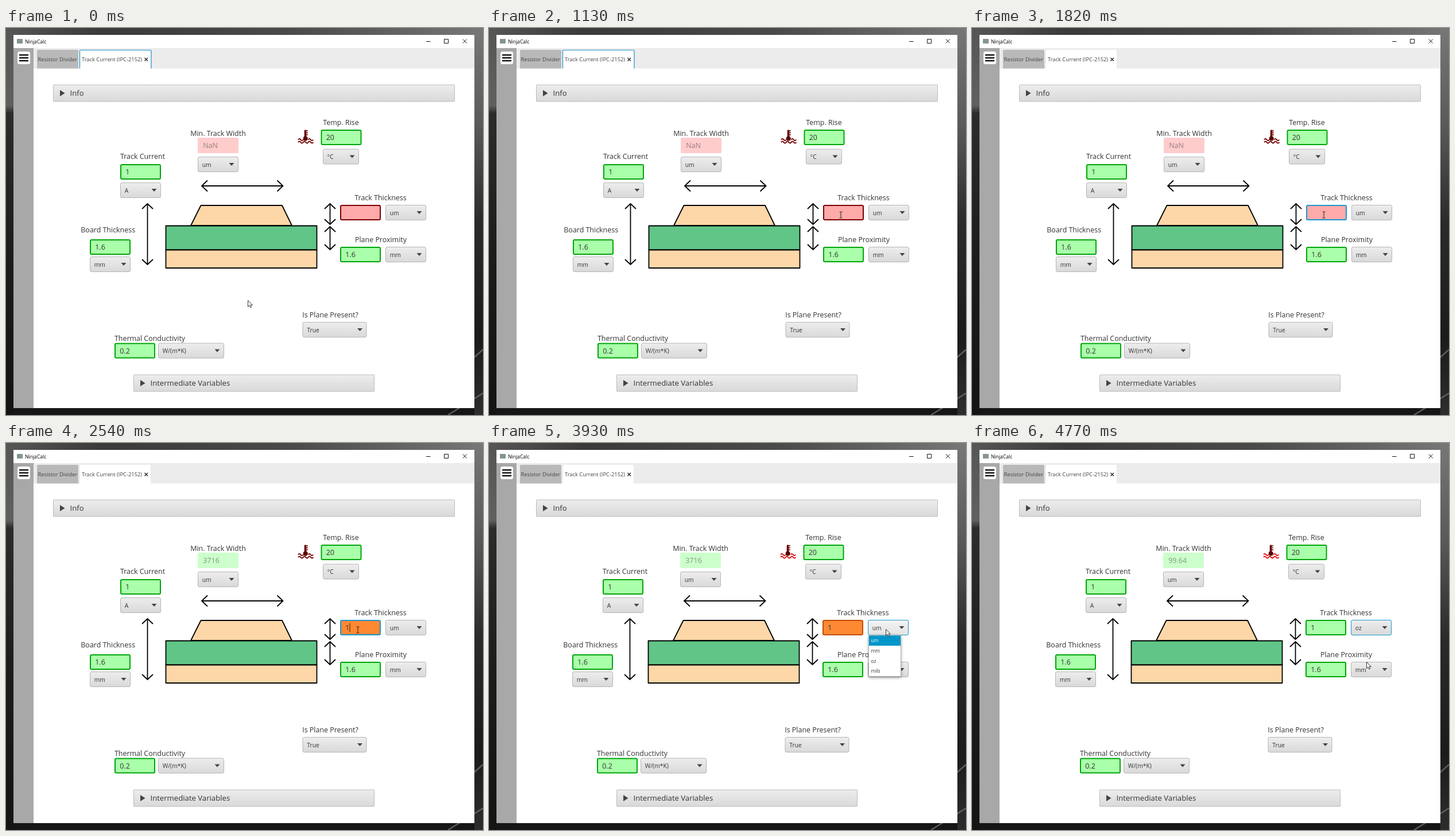
Write an HTML page that moves like this. It is 831 by 674 pixels and loops after 6.1 s.

```html
<!DOCTYPE html>
<html lang="en">
<head>
<meta charset="utf-8">
<title>Track current calculator</title>
<style>
  html, body { margin: 0; width: 100%; height: 100%; overflow: hidden; background: #1a1a1a; }
  svg { display: block; width: 831px; height: 674px; font-family: "Open Sans", "Noto Sans", sans-serif; }
  text { fill: #333; white-space: pre; }
  .label { font-size: 12.45px; text-anchor: middle; }
  .value { font-size: 12.5px; }
  .unit { font-size: 10.3px; }
  .item { font-size: 8.4px; }
  .tab { font-size: 9.35px; fill: #444; }
  .bar { font-size: 13.15px; }
  .line { fill: none; stroke: #000; stroke-width: 1.8; }
  .board { stroke: #000; stroke-width: 1.8; stroke-linejoin: round; }
</style>
</head>
<body>
<svg id="stage" viewBox="0 0 831 674"></svg>
<script>
const LOOP = 6100;
const GREEN = ['#aaffaa', '#00a50a'];
const RED = ['#ffaaaa', '#7c0000'];
const ORANGE = ['#ff8833', '#c14f00'];
const BLUE = '#1c97cd';
const ITEMS = ['um', 'mm', 'oz', 'mils'];

const rect = (x, y, w, h, fill, more = '') =>
  `<rect x="${x}" y="${y}" width="${w}" height="${h}" fill="${fill}" ${more}/>`;
const text = (kind, x, y, s, more = '') =>
  `<text class="${kind}" x="${x}" y="${y}" ${more}>${s}</text>`;
const path = (d, more = 'class="line"') => `<path d="${d}" ${more}/>`;
const gradient = (id, stops, dir = 'x2="0" y2="1"') =>
  `<linearGradient id="${id}" ${dir}>` +
  stops.map(([at, c]) => `<stop offset="${at}" stop-color="${c}"/>`).join('') + '</linearGradient>';

const field = (x, y, s, id = '') =>
  rect(x + 1, y + 1, 69, 25, GREEN[0], `rx="2" stroke="${GREEN[1]}" stroke-width="2" ${id && `id="${id}Box"`}`) +
  text('value', x + 9.2, y + 18, s, id && `id="${id}Text"`);

const combo = (x, y, w, s, id = '') =>
  rect(x + .5, y + .5, w - 1, 26, 'url(#button)', `rx="2.5" stroke="#b5b5b5" ${id && `id="${id}Box"`}`) +
  text('unit', x + 7.8, y + 17.5, s, id && `id="${id}Text"`) +
  path(`M${x + w - 16.5} ${y + 11}h9l-4.5 5z`, 'fill="#444"');

const bar = (x, y, w, s) =>
  rect(x + .5, y + .5, w - 1, 29, 'url(#button)', 'rx="1" stroke="#bcbcbc"') +
  path(`M${x + 12} ${y + 9.5}v11l8.5 -5.5z`, 'fill="#444"') +
  text('bar', x + 29.5, y + 19.5, s);

const arrowV = (x, top, bottom) =>
  path(`M${x} ${top + 1}V${bottom - 1}M${x - 9.5} ${top + 10}L${x} ${top + 1}l9.5 9` +
       `M${x - 9.5} ${bottom - 10}L${x} ${bottom - 1}l9.5 -9`);
const arrowH = (left, right, y) =>
  path(`M${left + 1} ${y}H${right - 1}M${left + 11} ${y - 9.5}L${left + 1} ${y}l10 9.5` +
       `M${right - 11} ${y - 9.5}L${right - 1} ${y}l-10 9.5`);
const wave = (x, y, n) => path(`M${x} ${y}` + 'q2.2 -3 4.4 0t4.4 0'.repeat(n), 'fill="none" stroke-width="1.9"');

const defs = '<defs>' +
  gradient('button', [[0, '#ededed'], [1, '#d9d9d9']]) +
  gradient('hover', [[0, '#f4f4f4'], [1, '#e2e2e2']]) +
  gradient('top', [[0, '#565656'], [.2, '#3a3a3a'], [.6, '#4a4a4a'], [1, '#777']], 'x2="1" y2="0"') +
  gradient('left', [[0, '#555'], [.2, '#606060'], [.22, '#2c2c2c'], [.6, '#1c1c1c'], [1, '#141414']]) +
  gradient('right', [[0, '#777'], [.25, '#5a5a5a'], [.5, '#2b2b2b'], [.8, '#1b1b1b'], [1, '#2d2d2d']]) +
  '<filter id="soft" x="-20%" y="-20%" width="140%" height="140%">' +
  '<feDropShadow dx="0" dy="2" stdDeviation="2.5" flood-opacity=".35"/></filter></defs>';

const desktop =
  rect(0, 0, 831, 674, '#161616') + rect(0, 0, 831, 13, 'url(#top)') +
  rect(0, 0, 13, 674, 'url(#left)') + rect(816, 0, 15, 674, 'url(#right)') +
  path('M814 575L831 560M770 674L831 636', 'stroke="#777" stroke-width="2.5" opacity=".7"');

const frame =
  rect(13, 12, 803, 650, '#fff') + rect(13, 35, 35, 627, '#a8a8a8') + rect(48, 35, 768, 35.5, '#ececec') +
  rect(19, 19, 10, 8, '#84968c') +
  text('title', 33, 26.5, 'NinjaCalc', 'font-size="8.6" style="fill:#000"') +
  path('M732 23.5h7.5M763.5 19.5h7v7h-7zM795.8 19.5l7 7m0 -7l-7 7', 'fill="none" stroke="#111"') +
  rect(20, 41, 22, 22, '#fff', 'rx="3.5"') +
  path('M24 47h14M24 52h14M24 57h14', 'stroke="#111" stroke-width="2.6" stroke-linecap="round"') +
  path('M54 70.5V40q0 -2 2 -2h68q2 0 2 2v30.5z', 'fill="#b9b9b9"') +
  text('tab', 55.5, 58, 'Resistor Divider') +
  path('M129 71V40q0 -2 2 -2h119q2 0 2 2v31z', 'fill="#fff"') +
  path('M128.5 70.5V40q0 -1.5 1.5 -1.5h121.500q1.500 0 1.500 1.500V70.500', `id="tabFocus" fill="none" stroke="${BLUE}" stroke-width="1.2"`) +
  text('tab', 132, 58, 'Track Current (IPC-2152)') +
  path('M241.500 52l5.500 5.500m0 -5.500l-5.500 5.500', 'stroke="#333" stroke-width="1.600"') +
  bar(82, 98.5, 700, 'Info') + bar(222, 603.5, 420, 'Intermediate Variables');

const labels = [
  [238, 227.5, 'Track Current'], [369.5, 187.5, 'Min. Track Width'], [583.5, 168.5, 'Temp. Rise'],
  [652.5, 299.5, 'Track Thickness'], [653, 373, 'Plane Proximity'], [177.7, 356, 'Board Thickness'],
  [565, 504, 'Is Plane Present?'], [250.5, 545, 'Thermal Conductivity']
].map(([x, y, s]) => text('label', x, y, s)).join('');

const thermometer = '<g id="heat" stroke="#780000">' +
  wave(509, 194.5, 1) + wave(526.4, 194.5, 1) + wave(509, 199, 3) +
  path('M522 178.500V191M522 179h4M522 182.500h4M522 186h4', 'stroke="#6c0000" fill="none" stroke-width="1.500"') +
  path('M521.500 179V191', 'stroke="#6c0000" stroke-width="3.600" stroke-linecap="round"') +
  '<circle cx="521.7" cy="192.5" r="4" fill="#5a0000" stroke="none"/></g>';

const calculator = '<g id="calc">' + labels + thermometer +
  field(199, 237, '1') + combo(199, 269, 71, 'A') +
  rect(334, 191, 71, 27, '#ffcccc', 'rx="2" id="widthBox"') +
  text('value', 343.2, 209, 'NaN', 'id="widthText" opacity=".5"') + combo(334, 224, 71, 'um') +
  field(548.5, 177, '20') + combo(552, 210.5, 63, '°C') +
  field(582, 308, '', 'thick') + combo(661, 308, 71, 'um', 'thickUnit') +
  field(582, 381, '1.6') + combo(661, 381, 71, 'mm') +
  field(146, 368, '1.6') + combo(146, 398, 71, 'mm') +
  combo(516.5, 512, 112, 'True') + field(189, 548.5, '0.2') + combo(265, 548.5, 115, 'W/(m*K)') +
  path('M339.500 309H481L498 344H322z', 'class="board" fill="#fdd7a8"') +
  rect(278.5, 344.5, 263, 42, '#60c587', 'class="board"') +
  rect(278.5, 386.5, 263, 31.5, '#fdd7a8', 'class="board"') +
  arrowH(340, 483.5, 275) + arrowV(246.5, 305, 413) + arrowV(564.5, 305, 343) + arrowV(564.5, 345, 387) +
  rect(0, 314, 1, 15, '#222', 'id="caret"') + '</g>';

const menu = '<g id="menu">' + rect(661.5, 335, 56, 71.5, '#fff', 'stroke="#b0b0b0" filter="url(#soft)"') +
  ITEMS.map((s, i) =>
    rect(662, 335.5 + i * 17.65, 55, 17.65, '#fff', `id="row${i}"`) +
    text('item', 665.5, 347.3 + i * 17.65, s, `id="item${i}"`)).join('') + '</g>';

const pointers =
  path('M.5 .5V11.500L3 9.200L4.900 13L6.700 12.200L4.900 8.500H8.300z', 'id="pointer" fill="#fff" stroke="#222" stroke-width=".9"') +
  path('M-2.500 -5.500h2l.5 .5l.5 -.5h2M0 -5V5M-2.500 5.500h2l.5 -.5l.5 .5h2', 'id="beam" fill="none" stroke="#222"');

document.getElementById('stage').innerHTML = defs + desktop + frame + calculator + menu + pointers;

const $ = id => document.getElementById(id);
const set = (id, attrs) => { for (const k in attrs) $(id).setAttribute(k, attrs[k]); };
const show = (id, on) => set(id, { visibility: on ? 'visible' : 'hidden' });
const write = (id, s) => { if ($(id).textContent !== s) $(id).textContent = s; };

// Each move: first step, last step, number of steps, destination.
const MOVES = [
  [370, 910, 8, 595, 337], [990, 1130, 3, 613, 325],
  [2910, 3460, 8, 691, 321], [3930, 4380, 7, 687, 381]
];

function mouseAt(t) {
  let x = 421, y = 474;
  for (const [start, end, count, toX, toY] of MOVES) {
    if (t < start) break;
    const step = Math.min(count, 1 + Math.floor((t - start) / (end - start) * (count - 1) + 1e-6));
    const p = step / count, e = p * p * (3 - 2 * p);
    x += (toX - x) * e;
    y += (toY - y) * e;
  }
  return [x, y];
}

function draw(t) {
  const [x, y] = mouseAt(t);
  const inField = x > 583 && x < 653 && y > 308 && y < 335;
  show('beam', inField);
  show('pointer', !inField);
  set(inField ? 'beam' : 'pointer', { transform: `translate(${Math.round(x)} ${Math.round(y) + (inField ? .5 : 0)})` });

  const focused = t >= 1820 && t < 3760, typed = t >= 2450, opened = t >= 3760, chosen = t >= 4620;
  const menuOpen = opened && t < 4770;
  show('tabFocus', t < 1820);
  set('calc', { transform: `translate(${opened ? -1 : 0} 0)` });
  set('heat', { stroke: opened ? '#dc1010' : '#780000' });

  const [fill, edge] = chosen ? GREEN : typed ? ORANGE : RED;
  set('thickBox', { fill, stroke: focused ? BLUE : edge });
  write('thickText', typed ? '1' : '');
  show('caret', focused && t >= 1920 && !(t >= 2989 && t < 3460));
  set('caret', { x: typed ? 598.5 : 591.5 });

  const solved = t >= 2540;
  set('widthBox', { fill: solved ? '#ccffcc' : '#ffcccc' });
  write('widthText', chosen ? '99.64' : solved ? '3716' : 'NaN');

  const hovered = x > 661 && y < 335 && t < 4770;
  set('thickUnitBox', { fill: `url(#${hovered ? 'hover' : 'button'})`, stroke: opened ? BLUE : '#b5b5b5' });
  write('thickUnitText', chosen ? 'oz' : 'um');

  show('menu', menuOpen);
  const over = Math.floor((y - 335.5) / 17.65), selected = chosen ? 2 : 0;
  ITEMS.forEach((_, i) => {
    const lit = i === over || i === selected;
    set('row' + i, { fill: lit ? '#0096c9' : '#fff' });
    $('item' + i).style.fill = lit ? '#fff' : '#333';
  });
}

const began = performance.now();
function tick() {
  draw((performance.now() - began) % LOOP);
  requestAnimationFrame(tick);
}
tick();
</script>
</body>
</html>
```
